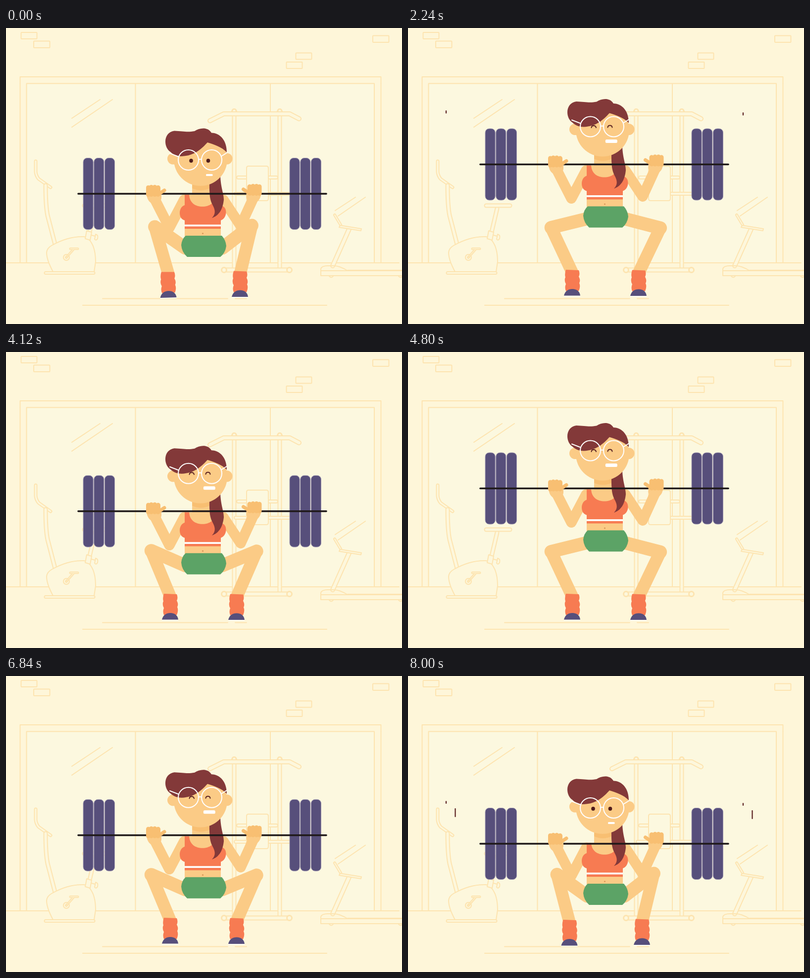
Write an HTML page that moves like this. It is 800 px wide and 600 px high and loops after 8.04 s.

```html
<!DOCTYPE html>
<html lang="en">
<head>
<meta charset="utf-8">
<title>Squat</title>
<style>
  html, body { margin: 0; width: 100%; height: 100%; overflow: hidden; background: #fef6d9; }
  svg { display: block; width: 800px; height: 600px; }
  .line { fill: none; stroke: #fde4b0; stroke-width: 2; stroke-linecap: round; stroke-linejoin: round; }
  .tube { fill: none; stroke-linecap: round; stroke-linejoin: round; }
  .limb { fill: none; stroke: #fbcb86; stroke-linecap: round; stroke-linejoin: round; }
  .skin { fill: #fbcb86; }
  .shade { fill: #f8bf72; }
  .hair { fill: #833939; }
  .orange { fill: #f77b52; }
  .plate { fill: #574f7b; stroke: #aaa3b8; stroke-width: 1; }
  .white { fill: none; stroke: #fff; stroke-width: 2; stroke-linecap: round; }
  .trail { stroke: #5c2323; stroke-width: 2.2; stroke-linecap: round; }
</style>
</head>
<body>
<svg viewBox="0 0 800 600">
  <defs>
    <g id="foot">
      <path class="orange" d="M-13 0L13 1Q16 8 13 14Q17 21 14 27Q17 34 13 43L-13 43Q-16 36 -13 29Q-17 22 -14 15Q-16 9 -13 0Z"/>
      <path d="M-17 53.5H16" stroke="#fffdf4" stroke-width="2"/>
      <path fill="#574f7b" d="M-17 52.5C-15 43 -8 39 0 39C9 39 15 44 16 52.5Z"/>
    </g>
    <g id="hand">
      <path class="skin" d="M284 338H314V345Q312 356 299 357Q286 354 284 338Z"/>
      <path d="M311 335L320 329" stroke="#f8bf72" stroke-width="7" stroke-linecap="round"/>
      <g class="shade">
        <rect x="283" y="319" width="9" height="23" rx="4.5"/>
        <rect x="289" y="318" width="9" height="24" rx="4.5"/>
        <rect x="296" y="318" width="9" height="24" rx="4.5"/>
        <rect x="302.500" y="319" width="9.500" height="23" rx="4.700"/>
        <rect x="286" y="324" width="23" height="15"/>
      </g>
    </g>
  </defs>

  <rect width="800" height="600" fill="#fef6d9"/>
  <rect x="41.500" y="112.500" width="702.500" height="363" fill="#fcf8df"/>
  <g class="line">
    <path d="M28.500 476V99H757.500V476M41.500 476V112.500H744V476M261.500 113V476M534 113V476M0 476H794"/>
    <path d="M133 183L190 145M133 201L215 145M665 370L706 343M671 381L726 343"/>
    <path d="M195 548.500H448M463 548.500H486M155 562H648"/>
    <rect x="30.500" y="9" width="32" height="13" rx="1"/>
    <rect x="56" y="26.500" width="32.500" height="13.500" rx="1"/>
    <rect x="741" y="15.500" width="32.500" height="13.500" rx="1"/>
    <rect x="585.500" y="50.500" width="32" height="13" rx="1"/>
    <rect x="566.500" y="69" width="32" height="13" rx="1"/>
  </g>
  <g id="gear"></g>

  <g id="trails"></g>
  <g id="arms">
    <path class="limb" stroke-width="21" d="M360 348L330 405L300 346M439 348L474 401L500 344"/>
  </g>
  <g id="legs"></g>
  <g id="torso">
    <path class="skin" d="M361 338H434V425H361Z"/>
    <rect class="skin" x="376" y="300" width="35" height="45"/>
    <path class="shade" d="M376 314H411V325Q394 333 376 325Z"/>
    <path class="orange" d="M361 338H370C371 355 383 362 397 362C411 362 422 355 425 338H434V360C441 361 444.500 366 444.500 374C444 383 439 388 434 390V407H361V390C354 388 351 382 351 375C351 367 355 361 361 359Z"/>
    <rect x="361" y="398.500" width="73" height="3.700" fill="#fff"/>
    <circle cx="397.500" cy="416.500" r="1.600" fill="#d99a5c"/>
    <path fill="#5ca366" d="M363 421H436Q444 430 445 442Q443 456 433 464H366Q355 454 354 440Q355 428 363 421Z"/>
    <path class="hair" d="M411 300H433C434 325 440 335 440 348C438 369 429 381 416 385C425 376 422 367 417 358C410 344 411 330 411 300Z"/>
  </g>
  <g id="head">
    <g class="skin">
      <circle cx="337.500" cy="265" r="11.500"/>
      <circle cx="446" cy="265" r="11.500"/>
      <circle cx="393" cy="266" r="54"/>
    </g>
    <path class="hair" d="M332 251C318 242 317 212 340 208.500C358 209 366 212 381 209C391 202 408 200 415 212.500C433 213 446 228 446 252C436 241 420 236 407 232C394 246 380 259 355 260C345 260 337 256 332 251Z"/>
    <g id="face">
      <g id="openEyes" fill="#4f1c1c">
        <ellipse cx="374" cy="269" rx="3.800" ry="4.100"/>
        <ellipse cx="408.500" cy="269" rx="3.800" ry="4.100"/>
      </g>
      <path id="shutEyes" fill="none" stroke="#5c2323" stroke-width="2" stroke-linecap="round" d="M370.500 269.500C371 264 379 264 380 269.500M403.500 269C404 263.500 412 263.500 412.500 269"/>
      <g class="white">
        <circle cx="368.500" cy="267.500" r="20.500"/>
        <circle cx="415.500" cy="267.500" r="20.500"/>
        <path d="M389 267Q392 265 395 267M331 254L349 261M435 260L446 253"/>
      </g>
      <rect id="mouth" fill="#fff"/>
    </g>
  </g>
  <g id="bar">
    <g id="plates"></g>
    <path d="M146 336H647" stroke="#1f1919" stroke-width="3.600" stroke-linecap="round"/>
  </g>
  <g id="hands">
    <use href="#hand"/>
    <use href="#hand" transform="translate(799.500 -2) scale(-1 1)"/>
  </g>
</svg>
<script>
const LOOP = 8040, CYCLE = 2720, STEP = 40;
const THIGH = 75, SHIN = 101;
const el = id => document.getElementById(id);

function add(parent, tag, attrs) {
  const node = document.createElementNS("http://www.w3.org/2000/svg", tag);
  for (const name in attrs) node.setAttribute(name, attrs[name]);
  return parent.appendChild(node);
}

// Gym equipment in outline
const gear = el("gear");
function tube(d, width = 8, fill = "#fdf7dc") {
  add(gear, "path", { class: "tube", d, stroke: "#fde4b0", "stroke-width": width + 2 });
  add(gear, "path", { class: "tube", d, stroke: fill, "stroke-width": width - 2 });
}
const line = (d, fill = "none") => add(gear, "path", { class: "line", d, style: `fill:${fill}` });

tube("M60 270V292Q61 300 66 306L90 323", 5);
tube("M80 319Q80 360 84 380L99 438", 7);
tube("M166 426L180 366", 7);
tube("M158 360H206", 7);
line("M82 455Q83 446 92 441Q125 422 157 423Q168 424 176 442Q181 455 181 474L178 494H95Q82 470 82 455Z", "#fdf7dc");
line("M163 411L173 414L170 430L160 427ZM173 420L180 422M181 418Q187 419 185 427Q182 432 179 428Z", "#fdf7dc");
tube("M80 496.500H177", 5);
tube("M122 465L136 449M130 447.500H145", 3);
line("M122 459A6 6 0 1 1 121.900 459ZM122 463A2 2 0 1 1 121.900 463Z");

tube("M461 168V486M553 168V486", 7);
tube("M469 303H546M464 336H573", 6);
line("M490 280H526Q530 280 530 284V346Q530 350 526 350H490Q486 350 486 346V284Q486 280 490 280Z", "#fcf8df");
tube("M412 188L440 174H573L592 184", 8);
line("M456 169Q457 164 461 164Q465 164 466 169M548 169Q549 164 553 164Q557 164 558 169");
tube("M441 490.500H572", 8);
for (const cx of [440.500, 572.500]) add(gear, "circle", { class: "line", cx, cy: 490.500, r: 5, style: "fill:#fdf7dc;stroke-width:3" });

tube("M660 482L693 408", 8);
tube("M664 379L676 399", 4);
line("M675 400L718 407L717 411L673 404Z", "#fdf7dc");
line("M636 492V488Q638 482 650 482H662Q674 482 690 492H800M636 492V502H802M636 492H690M690 491H800M653 503Q657 508 661 503M793 503Q797 508 801 503");

for (const x of [156, 177.700, 199.400, 573, 594.700, 616.400])
  add(el("plates"), "rect", { class: "plate", x, y: 263.500, width: 20.200, height: 145, rx: 8 });

// Falling streaks beside the weights
const trails = [
  { x: 95.500, top: 190, bottom: 285, delay: 30 },
  { x: 77, top: 168, bottom: 258, delay: 0 },
  { x: 695.500, top: 194, bottom: 289, delay: 30 },
  { x: 677, top: 172, bottom: 262, delay: 0 }
].map(t => ({ ...t, node: add(el("trails"), "line", { class: "trail", x1: t.x, x2: t.x }) }));

const legs = [-1, 1].map(side => ({
  side,
  thigh: add(el("legs"), "path", { class: "limb", "stroke-width": 27 }),
  shin: add(el("legs"), "path", { class: "limb", "stroke-width": 25 }),
  foot: add(el("legs"), "use", { href: "#foot" })
}));

// Sine-eased value between [time, value] keys
function keyed(time, keys) {
  if (time <= keys[0][0]) return keys[0][1];
  for (let i = 1; i < keys.length; i++) {
    const [t0, v0] = keys[i - 1], [t1, v1] = keys[i];
    if (time <= t1) return v0 + (v1 - v0) * (1 - Math.cos(Math.PI * (time - t0) / (t1 - t0))) / 2;
  }
  return keys[keys.length - 1][1];
}
const clamp = v => Math.max(0, Math.min(1, v));
const shift = (id, y) => el(id).setAttribute("transform", `translate(0 ${y})`);

function poseLeg(leg, lift, x, y, tilt) {
  const hip = { x: 399.500 + leg.side * 37.500, y: 446 - lift };
  const ankle = { x, y: y + 6 };
  const dx = ankle.x - hip.x, dy = ankle.y - hip.y, dist = Math.hypot(dx, dy);
  const along = (THIGH ** 2 - SHIN ** 2 + dist ** 2) / (2 * dist);
  const out = Math.sqrt(Math.max(0, THIGH ** 2 - along ** 2)) * leg.side;
  const kx = hip.x + (dx * along + dy * out) / dist;
  const ky = hip.y + (dy * along - dx * out) / dist;
  leg.thigh.setAttribute("d", `M${hip.x} ${hip.y}L${kx} ${ky}`);
  leg.shin.setAttribute("d", `M${kx} ${ky}L${ankle.x} ${ankle.y}`);
  leg.foot.setAttribute("transform", `translate(${x} ${y}) rotate(${tilt} 0 50)`);
}

function draw(time) {
  const p = time % CYCLE;
  const lift = keyed(p, [[0, 0], [520, 7.500], [1200, 0], [1840, 59.500], [2240, 59.500], [2520, 0]]);
  const strain = keyed(p, [[0, 0], [200, 1], [2320, 1], [2520, 0]]);
  const bounce = p > 2480 ? 4.600 * Math.sin(Math.PI * (p - 2480) / 240) : 0;

  for (const id of ["arms", "torso", "head", "hands"]) shift(id, -lift);
  shift("bar", bounce - lift);
  shift("face", -8 * strain);
  el("openEyes").style.display = strain < 0.5 ? "" : "none";
  el("shutEyes").style.display = strain < 0.5 ? "none" : "";

  const width = 13.500 + 10.500 * strain, height = 4 + 3 * strain;
  const mouth = { x: 410.800 - width / 2, y: 298 - height / 2 - strain, width, height, rx: 1.500 + strain };
  for (const name in mouth) el("mouth").setAttribute(name, mouth[name]);

  const raise = keyed(p, [[1200, 0], [1400, 1], [2240, 1], [2520, 0]]);
  const leftX = keyed(p, [[0, 328.500], [280, 331], [1400, 332], [2240, 332], [2520, 326.500], [2600, 326.500], [2720, 328.500]]);
  const tilt = keyed(p, [[0, -2], [280, -4], [1200, -3], [1400, 0], [2600, 0], [2720, -2]]);
  const rightX = keyed(p, [[0, 473], [280, 472.500], [1200, 472.500], [1400, 466], [2240, 466], [2520, 473]]);
  poseLeg(legs[0], lift, leftX, 494 - 4 * raise, tilt);
  poseLeg(legs[1], lift, rightX, 492.500 - 2 * raise, 0);

  for (const { node, top, bottom, delay } of trails) {
    const head = clamp((p - 2230 - delay) / 210);
    const tail = clamp((p - 2330 - delay) / 240);
    node.setAttribute("y1", top + (bottom - top) * tail);
    node.setAttribute("y2", top + (bottom - top) * head);
    node.style.display = head > tail ? "" : "none";
  }
}

const start = performance.now();
function tick() {
  const time = (performance.now() - start) % LOOP;
  draw(Math.floor(time / STEP) * STEP);
  requestAnimationFrame(tick);
}
draw(0);
requestAnimationFrame(tick);
</script>
</body>
</html>
```
